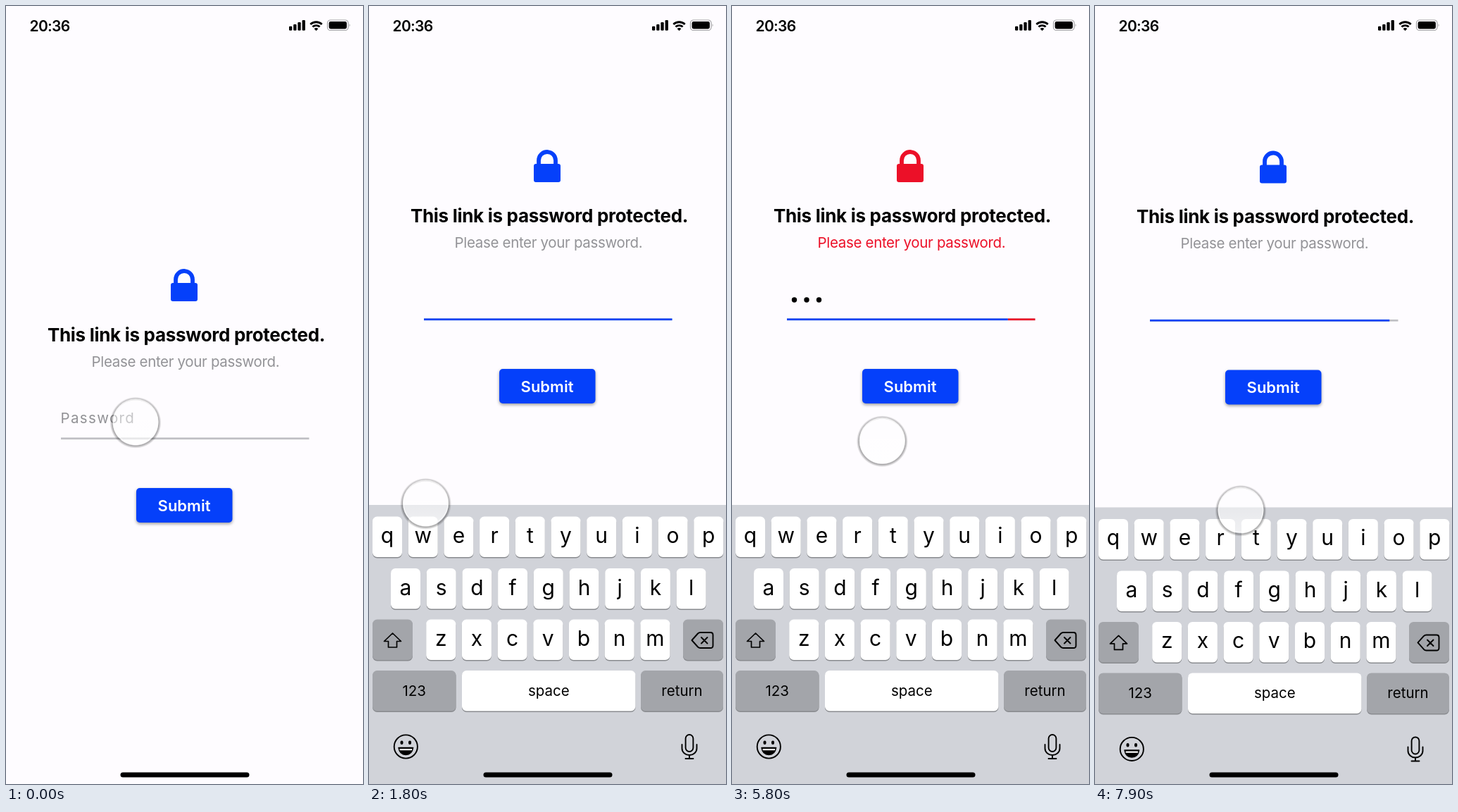
An HTML page that plays this animation: 507 px wide and 1104 px high, repeating every 8 s.

```html
<!DOCTYPE html>
<html lang="en">
<head>
<meta charset="utf-8">
<title>Password screen</title>
<style>
html, body { margin: 0; width: 100%; height: 100%; overflow: hidden; background: #fefcff; }
svg { display: block; width: 100%; height: 100%; font-family: Inter, Roboto, sans-serif; }
.mid { text-anchor: middle; }
.line { fill: none; stroke: #000; stroke-width: 1.9; stroke-linecap: round; stroke-linejoin: round; }
#button { filter: drop-shadow(0 2px 2px rgba(0, 0, 0, .38)); }
</style>
</head>
<body>
<svg viewBox="0 0 507 1104">
  <defs>
    <linearGradient id="glass" x2="0" y2="1">
      <stop stop-color="#fff" stop-opacity=".35"/>
      <stop offset="1" stop-color="#fff" stop-opacity=".68"/>
    </linearGradient>
    <radialGradient id="shade">
      <stop offset=".86" stop-opacity="0"/>
      <stop offset=".9" stop-opacity=".34"/>
      <stop offset="1" stop-opacity="0"/>
    </radialGradient>
  </defs>

  <text x="33.5" y="36" font-size="21" font-weight="600" letter-spacing="-.7">20:36</text>
  <g id="bars"></g>
  <g fill="none" stroke="#000" stroke-width="2.8">
    <path d="M432.3 26a12 12 0 0 1 16.4 0M435.4 29.6a7.4 7.4 0 0 1 10.2 0"/>
    <path d="M437.6 32.2a4.3 4.3 0 0 1 5.8 0l-2.9 3z" fill="#000" stroke="none"/>
  </g>
  <rect x="456.5" y="20" width="29.5" height="14.5" rx="4.2" fill="none" stroke="#a3a3a6" stroke-width="1.2"/>
  <rect x="458.6" y="22" width="25.3" height="10.5" rx="2.4"/>
  <path d="M487.6 25.3q2 2 0 4.2z" fill="#a3a3a6"/>

  <g id="form">
    <g id="lock">
      <path d="M241 395v-7a12 12 0 0 1 24 0v7" fill="none" stroke="currentColor" stroke-width="5.8"/>
      <rect x="234" y="393" width="38" height="26" rx="3" fill="currentColor"/>
    </g>
    <text class="mid" x="256" y="476" font-size="26" font-weight="700" letter-spacing="-.3">This link is password protected.</text>
    <text id="hint" class="mid" x="255" y="511.5" font-size="20.5" letter-spacing="-.33" fill="currentColor">Please enter your password.</text>
    <text id="label" x="77.5" y="592" font-size="20.5" letter-spacing="1.35" fill="#929296">Password</text>
    <g id="dots">
      <circle cx="88.5" cy="586" r="3.7"/>
      <circle cx="106" cy="586" r="3.7"/>
      <circle cx="123.5" cy="586" r="3.7"/>
    </g>
    <rect x="78" y="612.4" width="352.5" height="2.7" fill="#bfbfc3"/>
    <rect id="red" y="612.4" height="2.7" fill="#ec1028"/>
    <rect id="blue" x="78" y="612.4" height="2.7" fill="#0a43f5"/>
    <g id="button">
      <rect x="185" y="684" width="136.5" height="49" rx="5" fill="#0540fa"/>
    </g>
    <text class="mid" x="253" y="716.5" font-size="22" font-weight="600" fill="#fff">Submit</text>
  </g>

  <g id="board">
    <rect y="708" width="507" height="420" fill="#d1d3d9"/>
    <g id="keys"></g>
    <g class="line">
      <path d="M33.5 890l12 11.5h-6v8.5h-12v-8.5h-6z" stroke-width="1.7"/>
      <path d="M458.5 900l8.5-9.5q1.5-1.5 3.5-1.5h14.5q3.5 0 3.5 3.5v15q0 3.5-3.5 3.5h-14.5q-2 0-3.5-1.5zM472 896l8.5 8.5M480.5 896l-8.5 8.5"/>
      <circle cx="52.3" cy="1051" r="16.6"/>
      <path d="M42 1052.5h20.6q-1.500 10-10.300 10t-10.300-10z" fill="#000" stroke-width="1.5"/>
      <path d="M44.5 1055.200h15.600" stroke="#fff" stroke-width="2.2"/>
      <path d="M46.500 1044.500v1.500M58 1044.500v1.500" stroke-width="4"/>
      <rect x="449.600" y="1034" width="10.800" height="24" rx="5.400"/>
      <path d="M444.500 1048v5.500a10.500 9.500 0 0 0 21 0v-5.500M455 1063v5M449.500 1068h11"/>
    </g>
  </g>

  <rect x="162.500" y="1087.500" width="183" height="7" rx="3.500"/>
  <g id="touch">
    <circle cy="1.2" r="36.500" fill="url(#shade)"/>
    <circle r="31.800" fill="url(#glass)" stroke="rgba(255,255,255,.75)" stroke-width="1.500"/>
  </g>
</svg>
<script>
const LOOP = 8000;
const $ = id => document.getElementById(id);
const blue = '#0540fa', red = '#ec1028', gray = '#939397', dark = '#a3a5aa';

function add(parent, tag, attrs, text = '') {
  const el = document.createElementNS('http://www.w3.org/2000/svg', tag);
  for (const k in attrs) el.setAttribute(k, attrs[k]);
  el.textContent = text;
  return parent.appendChild(el);
}

for (let i = 0; i < 4; i++) {
  const h = 6 + i * 2.9;
  add($('bars'), 'rect', { x: 402 + i * 6.2, y: 34.8 - h, width: 4.3, height: h, rx: 1.2 });
}

const keys = {};
function addKey(x, y, w, text, size, fill = '#fff') {
  add($('keys'), 'rect', { x, y: y + 1.5, width: w, height: 57.5, rx: 6.5, fill: '#898b8f' });
  keys[text] = add($('keys'), 'rect', { x, y, width: w, height: 57.5, rx: 6.5, fill });
  add($('keys'), 'text', { x: x + w / 2, y: y + (size > 25 ? 37.5 : 36), 'font-size': size, class: 'mid' }, text);
}
[['qwertyuiop', 5, 724.5], ['asdfghjkl', 31, 798], ['zxcvbnm', 81.2, 870.5]].forEach(([row, x, y]) =>
  [...row].forEach((c, i) => addKey(x + i * 50.7, y, 42, c, 30)));
addKey(5, 870.5, 57, '', 20, dark);
addKey(446, 870.5, 57, '', 20, dark);
addKey(5, 943, 118.5, '123', 20.5, dark);
addKey(132, 943, 246.5, 'space', 20.5);
addKey(386, 943, 117, 'return', 20.5, dark);

// Critically damped spring from 0 to 1, starting at the given time.
function spring(t, start, speed) {
  const x = Math.max(0, t - start) / 1000 * speed;
  const v = 1 - (1 + x) * Math.exp(-x);
  return v > .996 ? 1 : v;
}

// Touch point: time, x, y, scale, opacity
const path = [
  [0, 184, 590, 1, 1], [300, 184, 590, 1, 1], [500, 184, 590, .95, .9],
  [1150, 184, 590, .95, .9], [1300, 184, 590, 1, 1], [2100, 33, 758, 1, 1],
  [3000, 33, 758, 1, 1], [3700, 318, 553, 1, 1], [4650, 318, 553, 1, 1],
  [5450, 73, 752, 1, 1], [5600, 73, 752, 1, 1], [5920, 277, 555, 1, 1],
  [6300, 277, 630, 1, .6], [6700, 270, 620, 1, .8], [7250, 244, 586, 1, 1],
  [7500, 244, 586, 1, 1], [7900, 207, 715, 1, 1], [8000, 196, 733, 1, 1]
];
function touchAt(t) {
  const i = path.findIndex(p => p[0] > t), a = path[i - 1], b = path[i];
  const u = (t - a[0]) / (b[0] - a[0]), e = u * u * (3 - 2 * u);
  return a.map((v, k) => v + (b[k] - v) * e);
}

const within = (t, a, b) => t >= a && t < b;
const move = (el, y) => el.setAttribute('transform', `translate(0 ${y})`);

function draw(t) {
  const up = spring(t, 720, 12) - spring(t, 5968, 6.5) + spring(t, 7335, 12);
  move($('form'), -169 * up);
  move($('board'), 396 * (1 - up));

  const focus = Math.max(0, spring(t, 720, 9.4) - spring(t, 3800, 12) + spring(t, 5400, 9.4)
    - spring(t, 6032, 6.5) + spring(t, 7350, 9.4));
  const wrongLine = t < 5950 ? spring(t, 4472, 9.4) : 0;
  $('blue').setAttribute('width', 352.5 * focus);
  $('red').setAttribute('x', 78 + 352.5 * focus);
  $('red').setAttribute('width', 352.5 * Math.max(0, wrongLine - focus));

  const wrong = within(t, 4800, 6150);
  const fade = Math.min(1, Math.abs(t - 4800) / 230, Math.abs(t - 6150) / 230);
  $('lock').style.color = wrong ? red : blue;
  $('hint').style.color = wrong ? red : gray;
  $('lock').style.opacity = $('hint').style.opacity = fade;

  $('label').style.opacity = within(t, 750, 5950) || t > 7380 ? 0 : 1;
  const count = t >= 5950 ? 0 : [2300, 2850, 5500].filter(at => t >= at).length;
  [...$('dots').children].forEach((dot, i) => dot.style.opacity = i < count ? 1 : 0);

  keys.q.setAttribute('fill', within(t, 2250, 2400) || within(t, 2800, 2960) ? dark : '#fff');
  keys.w.setAttribute('fill', within(t, 5460, 5600) ? dark : '#fff');

  const [, x, y, scale, opacity] = touchAt(t);
  $('touch').setAttribute('transform', `translate(${x} ${y}) scale(${scale})`);
  $('touch').style.opacity = opacity;
}

const begin = performance.now();
function tick() {
  draw((performance.now() - begin) % LOOP);
  requestAnimationFrame(tick);
}
tick();
</script>
</body>
</html>
```
